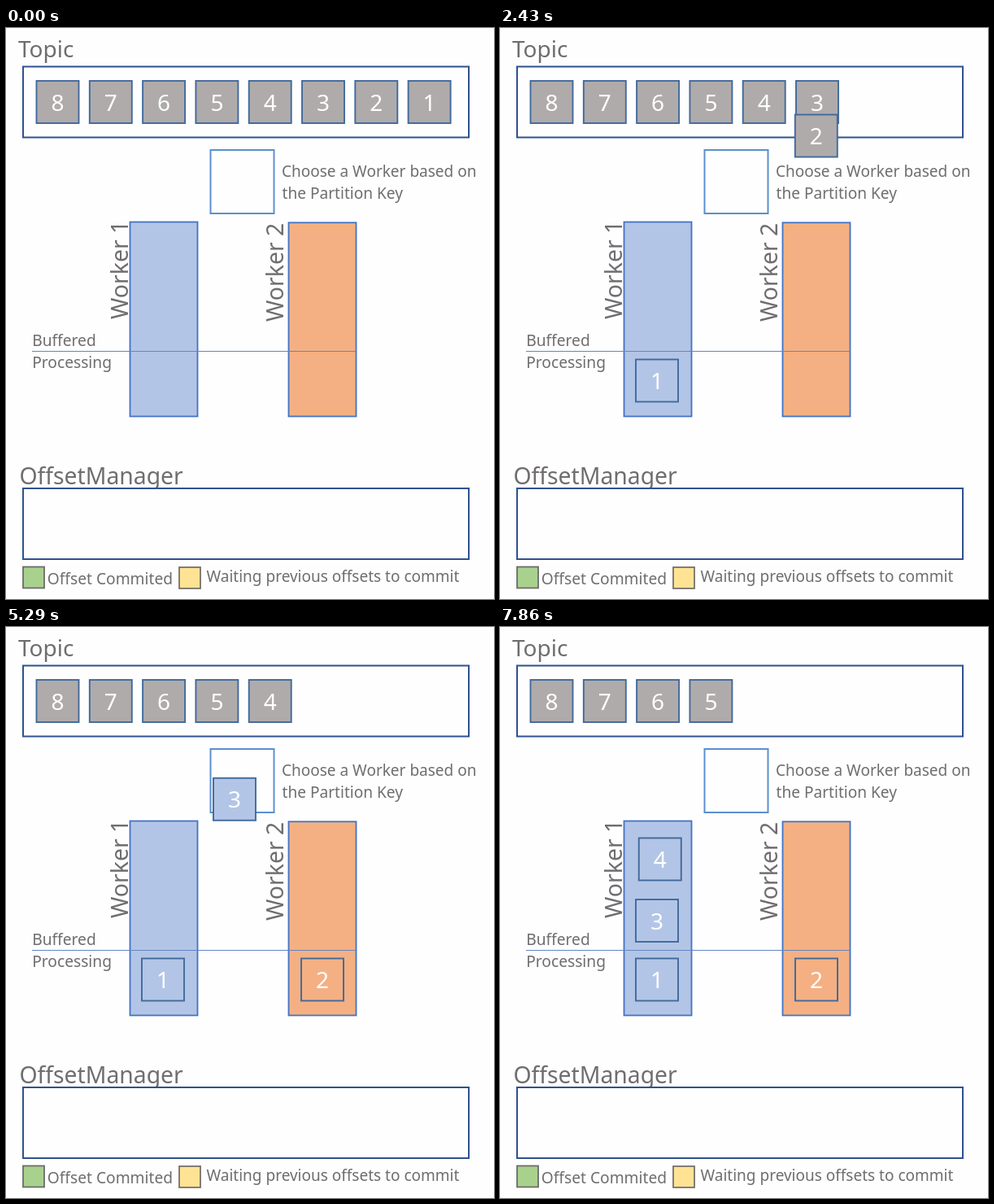
An HTML page for the animation above (8 s loop, 600 px wide and 702 px high).

```html
<!DOCTYPE html>
<html lang="en">
<head>
<meta charset="utf-8">
<title>Offset manager</title>
<style>
  html, body { margin: 0; width: 100%; height: 100%; overflow: hidden; background: #fefefe; }
  svg { display: block; width: 100vw; height: 100vh; font-family: "Noto Sans", "Open Sans", sans-serif; }
  text { fill: #706d70; }
  .tile text { fill: #fff; font-size: 28px; text-anchor: middle; }
</style>
</head>
<body>
<svg id="stage" viewBox="0 0 600 702"></svg>
<script>
const LOOP = 8000, FPS = 7;
const MOVE = 850, DISPATCH = 1040;
const GRAY = [175, 171, 171], BLUE = [179, 197, 230], ORANGE = [244, 176, 131];
const GATE = [292, 193];

// Tiles that leave the topic: start time, worker colour, resting place
const jobs = [
  { start: 28, color: BLUE, slot: [193, 433.5] },
  { start: 2045, color: ORANGE, slot: [389, 433.5] },
  { start: 4045, color: BLUE, slot: [193, 361] },
  { start: 6090, color: BLUE, slot: [192.6, 289.5] }
];

const stage = document.getElementById('stage');

function add(parent, tag, attrs, content) {
  const node = document.createElementNS('http://www.w3.org/2000/svg', tag);
  for (const key in attrs) node.setAttribute(key, attrs[key]);
  if (content) node.textContent = content;
  parent.appendChild(node);
  return node;
}

const rgb = c => `rgb(${c.map(Math.round).join(',')})`;
const mix = (a, b, p) => a.map((v, i) => v + (b[i] - v) * p);
const clamp = v => Math.min(1, Math.max(0, v));
const ease = u => u < 0.5 ? 2 * u * u : 1 - 2 * (1 - u) * (1 - u);

function box(x, y, width, height, fill, stroke, weight) {
  return add(stage, 'rect', { x, y, width, height, fill, stroke, 'stroke-width': weight });
}

function label(x, y, size, content) {
  return add(stage, 'text', { x, y, 'font-size': size }, content);
}

function sideLabel(x, y, content) {
  add(stage, 'text', { transform: `translate(${x} ${y}) rotate(-90)`, 'font-size': 28.4 }, content);
}

label(15, 36, 28, 'Topic');
label(16.5, 561, 28.3, 'OffsetManager');
box(21, 47.5, 548, 87, '#fefefe', '#2f528f', 2);
box(21, 566, 548, 87, '#fefefe', '#2f528f', 2);
box(251.5, 150, 78, 78, '#fefefe', '#5b8fd0', 2);
label(339, 183, 19, 'Choose a Worker based on');
label(339.5, 210, 19.1, 'the Partition Key');
box(152.5, 238.5, 83, 239, rgb(BLUE), '#4472c4', 1.8);
box(347.5, 239.3, 83, 238.2, rgb(ORANGE), '#4472c4', 1.8);
sideLabel(150, 358, 'Worker 1');
sideLabel(341, 361, 'Worker 2');
label(32.2, 391, 19.2, 'Buffered');
label(32.2, 418, 19.2, 'Processing');
box(21, 662.5, 26, 26, '#a9d18e', '#6b6b6b', 1.8);
box(213, 663, 26, 26, '#ffe394', '#77706b', 1.8);
label(50.8, 684, 19.2, 'Offset Commited');
label(246.5, 681, 19, 'Waiting previous offsets to commit');

const home = n => [585.9 - 65.3 * n, 91];
const tiles = {};
for (let n = 8; n >= 1; n--) {
  const g = add(stage, 'g', { class: 'tile' });
  const face = add(g, 'rect', {
    x: -26, y: -26, width: 52, height: 52, stroke: '#41699c', 'stroke-width': 1.9
  });
  add(g, 'text', { x: 0, y: 10.5 }, n);
  tiles[n] = { g, face };
  place(n, home(n), GRAY);
}
add(stage, 'path', { d: 'M32 397.5H430', stroke: '#6486c2', 'stroke-width': 1.1 });

function place(n, [x, y], color) {
  tiles[n].g.setAttribute('transform', `translate(${x.toFixed(2)} ${y.toFixed(2)})`);
  tiles[n].face.setAttribute('fill', rgb(color));
}

function render(ms) {
  // The picture advances in steps of one seventh of a second
  const t = Math.floor((ms % LOOP + 5) * FPS / 1000) % (LOOP * FPS / 1000) * 1000 / FPS;
  jobs.forEach(({ start, color, slot }, i) => {
    const n = i + 1, age = t - start;
    const toGate = ease(clamp(age / MOVE));
    const tint = clamp((age - MOVE) / (DISPATCH - MOVE));
    const toSlot = ease(clamp((age - DISPATCH) / MOVE));
    place(n, mix(mix(home(n), GATE, toGate), slot, toSlot), mix(GRAY, color, tint));
  });
}

const begin = performance.now();
function tick() {
  render(performance.now() - begin);
  requestAnimationFrame(tick);
}
tick();
</script>
</body>
</html>
```
